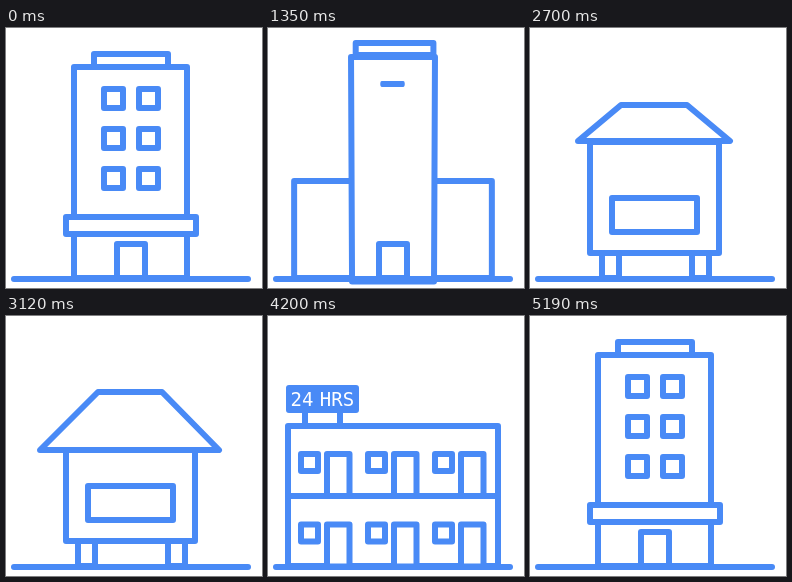
These frames come from a looping animation (256 by 260 pixels, 5490 ms). An HTML page:

```html
<!DOCTYPE html>
<html lang="en">
<head>
<meta charset="utf-8">
<title>Buildings</title>
<style>
  html, body { margin: 0; width: 100%; height: 100%; overflow: hidden; background: #fff; }
  svg { display: block; width: 100%; height: 100%; }
  .line { fill: #fff; stroke: #498af6; stroke-width: 6; stroke-linecap: round; stroke-linejoin: round; }
  .pop { transform-box: fill-box; }
  .sign { fill: #498af6; }
  text { font: 19px "DejaVu Sans Mono", monospace; fill: #fff; stroke: none; word-spacing: -5px; }
</style>
</head>
<body>
<svg viewBox="0 0 256 260">
  <g class="line" id="walls"></g>
  <g class="line" id="details"></g>
  <path class="line" d="M8 251H242"/>
</svg>
<script>
const PERIOD = 5490, STEP = 30, POP_IN = 270, POP_OUT = 210;
const NS = 'http://www.w3.org/2000/svg';
const walls = document.getElementById('walls');
const details = document.getElementById('details');

const linear = p => p;
const backOut = (p, c = 1.7) => 1 + (c + 1) * (p - 1) ** 3 + c * (p - 1) ** 2;
const settle = p => backOut(p ** 1.4);
const spring = p => backOut(p, 2.4);
const clamp = p => Math.min(1, Math.max(0, p));

// Four corners, clockwise from the top left.
const box = (l, t, r, b) => [l, t, r, t, r, b, l, b];
const boxPath = (l, t, r, b) => `M${l} ${t}H${r}V${b}H${l}Z`;

function add(parent, tag, attrs) {
  const node = document.createElementNS(NS, tag);
  for (const name in attrs) node.setAttribute(name, attrs[name]);
  return parent.appendChild(node);
}

// A morph moves from shape to shape; each key is [start, end, corners, easing].
const morphs = [];
function morph(first, ...keys) {
  morphs.push({ node: add(walls, 'polygon', {}), first, keys });
}

function corners({ first, keys }, t) {
  let from = first;
  for (const [start, end, to, ease = settle] of keys) {
    if (t < start) break;
    const p = ease(clamp((t - start) / (end - start)));
    from = from.map((v, i) => v + (to[i] - v) * p);
  }
  return from;
}

// Base
const aptBase = box(68, 198, 181, 250);
morph(aptBase,
  [180, 780, box(52, 180, 198, 250)],
  [1110, 1800, box(28, 155, 222, 250), spring],
  [2160, 2520, box(82, 200, 168, 222), linear],
  [4440, 5040, aptBase]);

// Main block
const aptMain = box(68, 39, 181, 250);
morph(aptMain,
  [180, 780, [62, 132, 188, 132, 207, 180, 42, 180]],
  [990, 1650, box(82, 34, 168, 250)],
  [2280, 2700, box(60, 114, 189, 225)],
  [3480, 3690, box(41, 155, 209, 234), linear],
  [3690, 4080, box(20, 180, 230, 250), spring],
  [4440, 5100, aptMain]);

// Top
const aptTop = box(88, 26, 162, 39);
morph(aptTop,
  [150, 780, box(73, 118, 95, 132)],
  [990, 1650, box(87, 20, 162, 32)],
  [2340, 2700, [91, 77, 157, 77, 200, 113, 48, 113], linear],
  [2700, 3090, [92, 76, 156, 76, 213, 134, 34, 134], spring],
  [3690, 4110, box(20, 110, 230, 180), spring],
  [4440, 5160, aptTop]);

// Details appear at start and leave at end; an end past the period wraps around.
const pops = [];
function pop(d, start, end, origin = 'center', axis = 'both') {
  const node = add(details, 'g', { class: 'pop' });
  if (d) add(node, 'path', { d });
  node.style.transformOrigin = origin;
  pops.push({ node, start, end, axis });
  return node;
}

// Apartment block
pop(boxPath(60, 189, 190, 206), 4800, PERIOD + 60, 'center', 'x');
for (let row = 0; row < 3; row++) {
  for (let col = 0; col < 2; col++) {
    const x = 98 + col * 35, y = 61 + row * 40, delay = (row * 2 + col) * 15;
    pop(boxPath(x, y, x + 19, y + 19), 4820 + delay, PERIOD + 60 + delay);
  }
}

// Shared front door
pop(boxPath(111, 216, 139, 250), 4830, PERIOD + 2280, 'bottom');

// Cottage
for (const x of [70, 152]) {
  pop(`M${x} 203V176L${x + 13.5} 165L${x + 27} 176V203Z`, 510, 930);
}
for (const x of [27, 161]) {
  let fence = boxPath(x, 226, x + 61, 250);
  for (let i = 1; i < 6; i++) fence += `M${x + i * 10.17} 226V250`;
  pop(fence, 540, 870, 'bottom');
}

// Office tower
for (let i = 0; i < 10; i++) {
  pop(`M100 ${56 + i * 16}H149`, 1320 + i * 30, 2100 + i * 9, 'center', 'x');
}
for (const x of [43, 183]) {
  for (let i = 0; i < 4; i++) {
    pop(`M${x} ${171 + i * 16}H${x + 24}`, 1590 + i * 30, 2100 + i * 15, 'center', 'x');
  }
}

// Hut on stilts
for (const x of [72, 162]) pop(boxPath(x, 225, x + 17, 250), 2430, 3480, 'top', 'y');
pop(boxPath(82, 170, 167, 204), 2430, 3240);

// Motel
for (let floor = 0; floor < 2; floor++) {
  for (let room = 0; room < 3; room++) {
    const x = 33 + room * 67, y = 138 + floor * 70.5, delay = room * 30;
    pop(boxPath(x, y, x + 17, y + 17), 3840 + delay, 4290 + delay);
    pop(boxPath(x + 26, y, x + 48.5, y + 42), 3870 + delay, 4320 + delay, 'bottom');
  }
}
const sign = pop('M37 97V110M72 97V110', 3900, 4290, 'bottom');
add(sign, 'rect', { class: 'sign', x: 21, y: 72, width: 67, height: 22 });
add(sign, 'text', { x: 22.5, y: 90 }).textContent = '24 HRS';

function popScale({ start, end }, now) {
  const t = end > PERIOD && now < start ? now + PERIOD : now;
  if (t < start || t >= end + POP_OUT) return 0;
  if (t < end) return backOut(clamp((t - start) / POP_IN));
  return 1 - ((t - end) / POP_OUT) ** 2;
}

function draw(t) {
  for (const part of morphs) {
    part.node.setAttribute('points', corners(part, t).map(v => v.toFixed(2)).join(' '));
  }
  for (const part of pops) {
    const s = popScale(part, t);
    part.node.style.display = s > 0.02 ? '' : 'none';
    part.node.style.transform =
      `scale(${part.axis === 'y' ? 1 : s}, ${part.axis === 'x' ? 1 : s})`;
  }
}

const began = performance.now();
function tick() {
  const t = (performance.now() - began) % PERIOD;
  draw(Math.floor(t / STEP) * STEP);
  requestAnimationFrame(tick);
}
tick();
</script>
</body>
</html>
```
